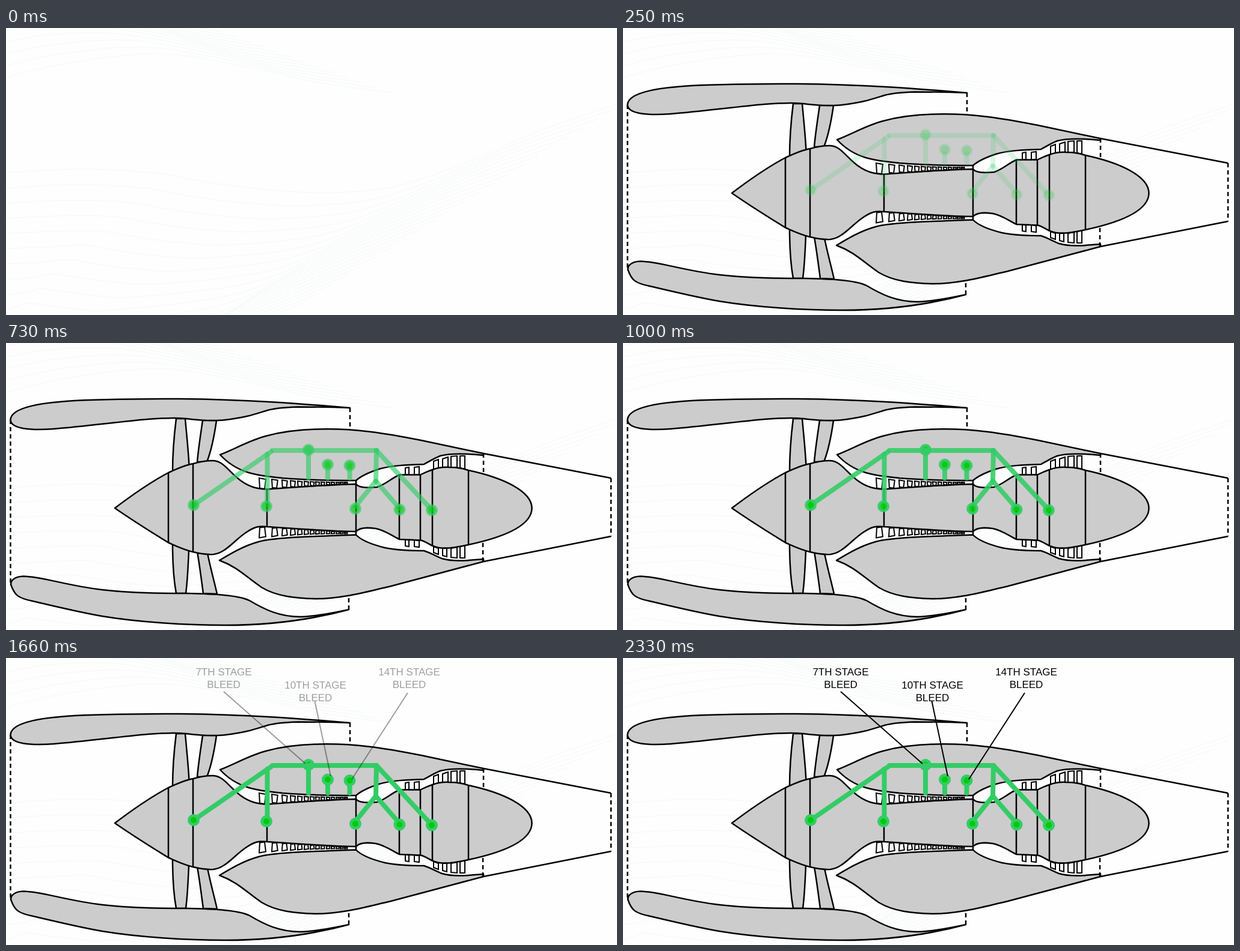
An HTML page for the animation above (7.72 s loop, 1016 by 478 pixels).

```html
<!DOCTYPE html>
<html lang="en">
<head>
<meta charset="utf-8">
<title>Engine bleed stages</title>
<style>
  html, body { margin: 0; width: 100%; height: 100%; overflow: hidden; background: #fefefe; }
  svg { display: block; width: 100%; height: 100%; }
  #waves { fill: none; stroke: #f5f8f8; stroke-width: 1; }
  #engine { fill: #ccc; stroke: #000; stroke-width: 2.5; stroke-linejoin: round; animation: show 7720ms infinite; }
  .line { fill: none; }
  .dash { fill: none; stroke-dasharray: 7 5; }
  #blades { fill: #fefefe; stroke-width: 2; stroke-linejoin: miter; }
  #bleed { stroke: #3c6; fill: #0c0; animation: bleed 7720ms infinite; }
  #bleed path { stroke-width: 8; stroke-linecap: round; }
  #bleed circle { stroke-width: 5; }
  #labels { animation: labels 7720ms infinite; font: 17px "Liberation Sans", Arial, sans-serif; text-anchor: middle; }
  #labels path { stroke: #000; stroke-width: 2; }

  @keyframes show {
    0% { opacity: 0; animation-timing-function: step-end; }
    .907%, 100% { opacity: 1; }
  }
  @keyframes bleed {
    0% { fill-opacity: 0; stroke-opacity: 0; animation-timing-function: step-end; }
    .907% { fill-opacity: .059; stroke-opacity: .059; animation-timing-function: steps(16); }
    14.508%, 100% { fill-opacity: 1; stroke-opacity: 1; }
  }
  @keyframes labels {
    0% { opacity: 0; }
    15.376% { opacity: 0; animation-timing-function: steps(16); }
    30.181%, 100% { opacity: 1; }
  }
</style>
</head>
<body>
<svg viewBox="0 0 1016 478">
  <g id="waves"></g>

  <g id="engine">
    <!-- fan and stator -->
    <path d="M283 126H298C300 150 303 175 304.500 205L277 215C277 180 280 150 283 126Z"/>
    <path d="M277 335L304 345C303 370 302 395 299 417H283C279 395 277 370 277 335Z"/>
    <path d="M327 129H350C347 150 342 178 334 198H318C320 175 324 150 327 129Z"/>
    <path d="M318 348L335 350C340 375 347 400 351 418L328 417C325 395 322 370 318 348Z"/>
    <!-- cowl -->
    <path d="M7.500 128C8 110 45 101 100 97C150 93.500 210 93 290 93C400 94 490 101 572 108C540 106.500 520 106.500 485 106.500C465 107 450 108 435 112C415 118 400 124 365 128C350 130 320 129 300 126C285 124 260 125 235 127C190 131 130 139 80 143C40 146 8 143 7.500 128Z"/>
    <path d="M8 402C8 394 16 389 29 388.500C60 389 100 404 160 411C200 416 250 417 300 417C340 418 385 419 405 429C430 444 455 456 490 456C520 455 545 449 570 444C500 463 430 470 365 470C300 470 220 465 160 455C120 448 80 438 45 430C20 425 14 420 8 402Z"/>
    <!-- core casing -->
    <path d="M356 186C380 177 405 162 432 155C465 146 495 144 520 143.500C580 142 630 150 690 162L794 184V187C765 184 740 183 722 188C712 192 704 197 695 202C665 203 640 204 620 210C605 215 592 220 582 229C540 229 500 228 460 225C420 221 385 218 356 186Z"/>
    <path d="M355 362C375 350 395 338 420 331C450 323 520 322 582 319.500C590 328 610 336 630 341C650 345 670 346 695 346C705 349 715 355 725 359C745 365 770 362 794 360V364C740 378 690 392 640 405C600 414 560 426 515 426C480 425 450 422 425 407C400 390 385 373 355 362Z"/>
    <path class="line" d="M794 184L1006 225M794 364L1006 322"/>
    <g id="blades"></g>
    <!-- shaft body -->
    <path d="M181 275C210 253 240 232 270 216C285 209 300 203 311 201C325 197 335 195.500 345 196C362 197 370 214 390 229C405 240 418 243 434 243.500C480 240 520 237 582 235C586 240 595 242 617 240C630 236 640 226 654 219.500H689C696 216 700 214 709 211C720 207 730 206.500 738 207C750 207 760 209 769 212C825 224 874 246 874.500 275C874 305 825 324 769 336C750 340 735 343 720 341C705 339 700 330 689 328.500L654 327C640 320 630 312 615 309C600 307 588 307 582 314C530 313 480 309 434 306C420 304 412 307 400 315C380 328 365 350 345 352C330 353 320 350 311 348C295 344 285 339 270 332.500C240 314 210 295 181 275Z"/>
    <path class="line" d="M270 216V332.500M311 201V348M434 243V306M582 229V320M654 219V327M689 219V328M709 211V339M769 212V336"/>
    <path class="dash" d="M7.500 128V402M572 108V143M570 444V421M794 184V218M793 364V331M1006 225V322"/>
  </g>

  <g id="bleed">
    <circle cx="503" cy="178" r="7.500"/>
    <path d="M312 270L441 181"/>
    <path d="M434.500 185V270"/>
    <path d="M443 179H616"/>
    <path d="M503 179V225"/>
    <path d="M535 202V225"/>
    <path d="M571.500 204V225"/>
    <path d="M616 179L615 230"/>
    <path d="M615 230L581 272"/>
    <path d="M615 230L654 275"/>
    <path d="M616 179L708 278"/>
    <circle cx="312" cy="270" r="7.500"/>
    <circle cx="433" cy="272" r="7.500"/>
    <circle cx="535" cy="202.500" r="7.500"/>
    <circle cx="571.500" cy="204" r="7.500"/>
    <circle cx="581" cy="276" r="7.500"/>
    <circle cx="654.500" cy="277.500" r="7.500"/>
    <circle cx="708" cy="278.500" r="7.500"/>
  </g>

  <g id="labels">
    <path d="M362 56L498 176M513.500 72L540 197M668 58L575 202"/>
    <text x="362" y="29">7TH STAGE</text><text x="362" y="50">BLEED</text>
    <text x="514.500" y="51">10TH STAGE</text><text x="514.500" y="72">BLEED</text>
    <text x="670.500" y="29">14TH STAGE</text><text x="670.500" y="50">BLEED</text>
  </g>
</svg>
<script>
  const addPath = (id, d) => {
    const path = document.createElementNS('http://www.w3.org/2000/svg', 'path');
    path.setAttribute('d', d);
    document.getElementById(id).append(path);
  };

  // Smooth curve through points (Catmull-Rom as cubic Béziers).
  function smooth(pts) {
    let d = `M${pts[0]}`;
    for (let i = 0; i < pts.length - 1; i++) {
      const [a, b, c, e] = [-1, 0, 1, 2].map(k => pts[Math.min(Math.max(i + k, 0), pts.length - 1)]);
      d += `C${[0, 1].map(j => b[j] + (c[j] - a[j]) / 6)} ${[0, 1].map(j => c[j] - (e[j] - b[j]) / 6)} ${c}`;
    }
    return d;
  }

  // Each knot is x, y and its shift from one wave line to the next.
  function waves(count, knots) {
    for (let i = 0; i < count; i++)
      addPath('waves', smooth(knots.map(([x, y, dx, dy]) => [x + dx * i, y + dy * i])));
  }
  waves(15, [[0, 82, 0, -19.5], [110, 57, -10, -15.5], [260, 43, -23, -11],
    [400, 65, -24, -10], [510, 89, -24, -9], [640, 108, -23.5, -8.5]]);
  waves(24, [[0, 241, 0, 25.3], [130, 235, -14, 26], [250, 242, -24, 24], [330, 256, -32, 22.5],
    [430, 269, -36, 22], [540, 274, -40, 21.7], [650, 263, -29, 19.8], [780, 219, -27, 17],
    [880, 174, -25, 16], [1032, 121, -24.4, 15.3]]);

  const quad = (x1, x2, y1, y2, y3, y4, taper = 0) =>
    addPath('blades', `M${x1} ${y1}L${x2} ${y2}L${x2 - taper} ${y3}L${x1 + taper / 2} ${y4}Z`);

  // Compressor blades shrink towards the rear, mirrored below the axis.
  const axis = 274.7;
  for (const x of [421, 442, 459, 473, 485, 496, 506, 515, 524, 533, 541, 549, 556, 563]) {
    const u = (x - 421) / 142, tip = 232 - 7 * (1 - u) ** 2, root = 243 - 8 * u;
    const width = 4.5 + 6.5 * (1 - u) ** 1.3, taper = 2 * (1 - u);
    quad(x, x + width, tip, tip + 2 * (1 - u), root, root - 1, taper);
    quad(x, x + width, 2 * axis - tip, 2 * axis - tip - 2 * (1 - u), 2 * axis - root, 2 * axis - root + 1, taper);
  }

  // Turbine blades
  quad(664, 670, 208, 207, 219, 219);
  quad(679, 687, 207, 206, 219, 219);
  quad(664, 670, 338, 339, 328, 327);
  quad(679, 687, 339, 340, 329, 328);
  quad(711, 719, 197, 194, 208, 211);
  quad(726, 735, 193, 190, 207, 207);
  quad(740, 750, 189, 188, 207, 207);
  quad(755, 763, 188, 188, 210, 208);
  quad(711, 719, 349, 352, 342, 339);
  quad(726, 733, 354, 356, 342, 342);
  quad(740, 750, 357, 358, 340, 342);
  quad(755, 763, 358, 358, 337, 339);
</script>
</body>
</html>
```
